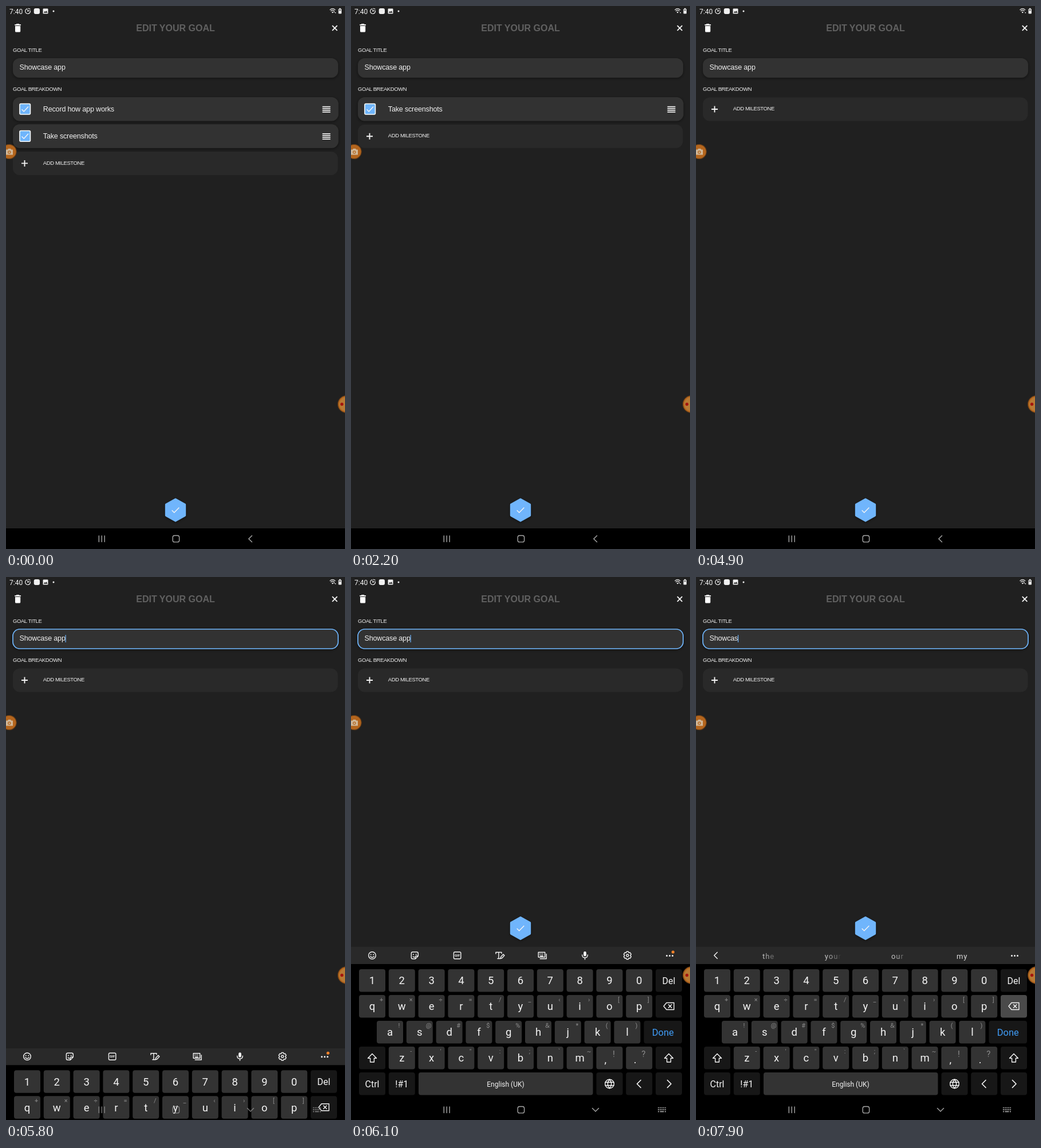
Write an HTML page that moves like this. It is 592 px wide and 947 px high and loops after 8 s.

```html
<!DOCTYPE html>
<html lang="en">
<head>
<meta charset="utf-8">
<title>Edit your goal</title>
<style>
  html, body { margin: 0; width: 100%; height: 100%; overflow: hidden; background: #202020; }
  svg { display: block; width: 100vw; height: 100vh; }
  text { white-space: pre; }
  .body { font: 12.5px "Liberation Sans", Arial, sans-serif; letter-spacing: -.15px; fill: #f2f2f2; }
  .label { font: 9.4px "Liberation Sans", Arial, sans-serif; letter-spacing: -.33px; fill: #f2f2f2; }
  .title { font: bold 16px "Liberation Sans", Arial, sans-serif; fill: #606060; }
  .key { font-family: Roboto, sans-serif; fill: #f4f4f4; text-anchor: middle; }
  .line { fill: none; stroke: #f4f4f4; stroke-width: 1.4; stroke-linecap: round; stroke-linejoin: round; }
</style>
</head>
<body>
<svg id="stage" viewBox="0 0 592 947" preserveAspectRatio="none"></svg>
<script>
const LOOP = 8000, STEP = 100, SWIPE = -119.5, KEYBOARD = 302;
const BLUE = '#6fb5fc', CARD = '#333331', KEY = '#333333', DARK = '#171717';

const group = (id, body, attrs = '') => `<g id="${id}" ${attrs}>${body}</g>`;
const at = (x, y, body) => `<g transform="translate(${x} ${y})">${body}</g>`;
const rect = (x, y, w, h, r, fill, attrs = '') =>
  `<rect x="${x}" y="${y}" width="${w}" height="${h}" rx="${r}" fill="${fill}" ${attrs}/>`;
const circle = (x, y, r, fill, attrs = '') => `<circle cx="${x}" cy="${y}" r="${r}" fill="${fill}" ${attrs}/>`;
const text = (x, y, cls, s, attrs = '') => `<text x="${x}" y="${y}" class="${cls}" ${attrs}>${s}</text>`;
const line = (d, attrs = '') => `<path d="${d}" class="line" ${attrs}/>`;
const shape = (d, fill) => `<path d="${d}" fill="${fill}"/>`;
const glyph = (x, y, size, s, fill = '#f4f4f4') =>
  text(x, y, 'key', s, `style="font-size:${size}px;fill:${fill}"`);

function statusBar() {
  return text(6, 13.5, 'key', '7:40', 'style="font-size:12px;text-anchor:start"')
    + line('M37 4.8A4.4 4.4 0 1 0 42.3 8M38 6.5V9.3L40.5 8M39 4.3L42 5.3', 'style="stroke-width:1.2"')
    + rect(48.7, 4, 10.3, 10, 3, '#f0f0f0')
    + rect(64.5, 4.5, 9, 9, 1.2, '#f0f0f0')
    + shape('M65.7 11.8L67.7 9L69 10.5L70.5 8.3L72.6 11.8Z', '#202020')
    + circle(83, 9, 1.5, '#f0f0f0')
    + line('M565.8 6.6Q570.3 2.8 574.8 6.6M567.4 8.6Q570.3 6.2 573.2 8.6', 'style="stroke-width:1.2"')
    + circle(570.3, 11, 1.2, '#f0f0f0')
    + group('uplink', shape('M571.8 11L573 9.2L574.2 11Z', '#f0f0f0'))
    + shape('M574 11L576.4 11L575.2 13Z', '#f0f0f0')
    + rect(580.5, 5, 5.5, 8.5, 1, '#e8e8e8') + rect(582, 3.8, 2.5, 1.5, .4, '#e8e8e8')
    + rect(581.6, 6, 3.3, 2.2, .3, '#777');
}

function header() {
  return shape('M18.5 31h4.2l.8 1H26v1.8H15.2V32h2.5zM16 34.8h9.2V44q0 1.6-1.6 1.6h-6Q16 45.6 16 44z', '#fff')
    + text(296, 43.6, 'title', 'EDIT YOUR GOAL', 'text-anchor="middle"')
    + line('M569.8 34.2L578.4 42.8M578.4 34.2L569.8 42.8', 'style="stroke-width:1.9;stroke-linecap:butt"')
    + text(12, 79.5, 'label', 'GOAL TITLE')
    + rect(12, 91, 568, 34, 12, CARD, 'id="field" filter="url(#shade)"')
    + text(23.5, 111, 'body', '', 'id="entry"')
    + rect(0, 101, 1.2, 13, 0, BLUE, 'id="caret"')
    + text(12, 148.2, 'label', 'GOAL BREAKDOWN');
}

function milestone(id, name) {
  const bars = [175.6, 178.7, 181.8, 184.9].map(y => rect(552.5, y - .8, 14, 1.7, 0, '#f2f2f2')).join('');
  const bin = line('M522.8 175.3H533M526.2 173.9H529.6M524 177.6V185.4Q524 186.6 525.2 186.6H530.6'
    + 'Q531.8 186.6 531.8 185.4V177.6Z', 'style="stroke:#fff;stroke-linecap:butt;stroke-width:1.5"');
  return group(id, rect(12, 159, 568.5, 41.5, 12, CARD, 'filter="url(#shade)"')
    + rect(23.9, 170.4, 18.6, 18.6, 2, BLUE, 'stroke="#fff" stroke-width="1.5"')
    + line('M27.5 180.3L31.2 184L39 175.5', 'style="stroke-linecap:butt"')
    + text(64.8, 184, 'body', name) + bars
    + rect(595, 159, 104.5, 41.5, 12, '#ec7673')
    + at(-SWIPE, 0, bin));
}

function addRow() {
  return group('add', rect(12, 159.5, 567.5, 41, 12, '#292929')
    + line('M27 180H38M32.5 174.5V185.5', 'style="stroke-width:1.9;stroke-linecap:butt"')
    + text(64.8, 182.3, 'label', 'ADD MILESTONE'));
}

function fab() {
  return group('fab', `<path d="M0-19L16.6-9.6V9.6L0 19L-16.6 9.6V-9.6Z" fill="${BLUE}" stroke="${BLUE}"
    stroke-width="3" stroke-linejoin="round" filter="url(#shade)"/>`
    + line('M-6.3.5L-2.3 4.5L6.3-4.3', 'style="stroke-linecap:butt"'));
}

function toolbar() {
  const icons = [
    circle(0, 0, 6.3, 'none', 'class="line"') + circle(-2.3, -1.6, 1, '#f4f4f4') + circle(2.3, -1.6, 1, '#f4f4f4')
      + line('M-3.2 1.8Q0 5 3.2 1.8'),
    line('M-6-3.5Q-6-6-3.5-6H3.5Q6-6 6-3.5V1L1 6H-3.5Q-6 6-6 3.5ZM1 6V3Q1 1 3 1H6M-3 2Q-2 3.4-.5 3')
      + circle(-2.4, -1.8, 1, '#f4f4f4') + circle(2.4, -1.8, 1, '#f4f4f4'),
    rect(-6.2, -6, 12.4, 12, 2, 'none', 'class="line"')
      + text(0, 2.2, 'key', 'GIF', 'style="font-size:6px;font-weight:bold"'),
    line('M-7-3V-5.5H3V-3.5M-2-5.5V5.5M-4 5.5H0M1 5.5L1.8 2.5L6-2L8 0L4 4.5Z'),
    line('M-7-5.5H4.5V3H-7ZM7-2.5V5.7H-4')
      + line('M-5-3H2.5M-5-.8H2.5', 'style="stroke-dasharray:1 1.4;stroke-linecap:butt"') + line('M-3.5 1.2H1'),
    rect(-2.4, -7, 4.8, 8.6, 2.4, '#f4f4f4') + line('M-4.8-1Q-4.8 4 0 4T4.8-1M0 4V7'),
    line('M-1.6-6.8H1.6L2.3-4.6L4.6-5L6.5-2.2L5 0L6.5 2.2L4.6 5L2.3 4.6L1.6 6.8H-1.6L-2.3 4.6L-4.6 5L-6.5 2.2'
      + 'L-5 0L-6.5-2.2L-4.6-5L-2.3-4.6Z') + circle(0, 0, 2, 'none', 'class="line"')
  ];
  return icons.map((icon, i) => at(37 + 74.3 * i, 660, icon)).join('') + circle(562.3, 654, 2.6, '#f0822b');
}

function suggestions() {
  const word = (s, i) => {
    const fade = [...s].map((c, k) => `<tspan fill-opacity="${[.85, .65, .4, .12][k]}">${c}</tspan>`);
    return text(126.5 + 112.7 * i, 665.6, 'key', s === 'my' ? s : fade.join(''),
      'style="font-size:13px;letter-spacing:.9px;fill:#ddd"');
  };
  return line('M37.2 654.5L31.7 660L37.2 665.5') + ['the', 'your', 'our', 'my'].map(word).join('');
}

function keyboard() {
  const pitch = 51.8, tops = [684, 729, 774, 819, 864];
  const cap = (x, row, w, fill, attrs) => rect(x, tops[row], w, 39.5, 4, fill, attrs);
  const run = (x0, row, keys, hints = '') => [...keys].map((c, i) => {
    const x = x0 + pitch * i, y = tops[row], small = ',.'.includes(c);
    const hint = hints[i] ? glyph(x + (small ? 30.5 : 39), y + (small ? 18 : 12), small ? 15 : 11, hints[i], '#8c8c8c') : '';
    return cap(x, row, 46, KEY) + glyph(x + (small ? 16 : 23), y + (small ? 29 : 26.3), 18.5, c) + hint;
  }).join('');
  const dark = (x, row, w, label = '', size = 16, fill) =>
    cap(x, row, w, DARK) + glyph(x + w / 2, tops[row] + 25.6, size, label, fill);
  const shift = x => dark(x, 3, 46) + at(x + 23, 839, line('M0-7.5L7.5.3H3.4V7H-3.4V.3H-7.5Z'));
  const right = 14 + pitch * 10;
  const globe = circle(0, 0, 7.8, 'none', 'class="line"')
    + line('M-7.5-2.7H7.5M-7.5 2.7H7.5M0-7.8Q-6.5 0 0 7.8M0-7.8Q6.5 0 0 7.8');
  return group('keyboard', rect(0, 645, 592, 302, 0, '#000') + rect(0, 645, 592, 30, 0, '#292929')
    + group('tools', toolbar()) + group('words', suggestions())
    + [551.5, 556.5, 561.5].map(x => circle(x, 660.5, 1.5, '#f4f4f4')).join('')
    + run(14, 0, '1234567890') + dark(right, 0, 46, 'Del')
    + run(14, 1, 'qwertyuiop', '+×÷=/_&lt;>[]'.replace('&lt;', '‹').replace('>', '›'))
    + cap(right, 1, 46, DARK, 'id="erase"')
    + at(555, 748.5, line('M-9 0L-4-6H9V6H-4ZM-.5-2.7L4.9 2.7M4.9-2.7L-.5 2.7'))
    + run(45, 2, 'asdfghjkl', '!@#$%§*()'.replace('§', '＆')) + dark(511.5, 2, 66.5, 'Done', 16.5, '#3f9bf5')
    + shift(14) + run(14 + pitch, 3, 'zxcvbnm,.', "-':;`~".replace(/.*/, '') || '-\'":;`~!?') + shift(right)
    + dark(14, 4, 46, 'Ctrl') + dark(14 + pitch, 4, 46, '!#1')
    + cap(118, 4, 304.5, KEY) + glyph(270, 888.5, 12, 'English (UK)')
    + dark(428.5, 4, 46) + at(451.5, 884, globe)
    + dark(480.2, 4, 46) + line('M506 877.5L499.5 884L506 890.5', 'style="stroke-width:1.7"')
    + dark(right, 4, 46) + line('M552.5 877.5L559 884L552.5 890.5', 'style="stroke-width:1.7"'));
}

function navBar() {
  const keys = line('M536 925.6H550M536 929H550', 'style="stroke-dasharray:1.8 1.3;stroke-linecap:butt;stroke-width:1.8"')
    + line('M536 932.4H538M539.5 932.4H546.5M548 932.4H550', 'style="stroke-linecap:butt;stroke-width:1.8"');
  return group('nav', line('M162.3 924V934.5M167.2 924V934.5M172.1 924V934.5')
    + rect(291.2, 923.5, 11.4, 11.4, 3.2, 'none', 'class="line"')
    + group('back', line('M429.5 923.8L423.8 929.3L429.5 934.8'))
    + group('down', line('M421.5 926.6L427 932L432.5 926.6') + keys));
}

function floaters() {
  const orange = 'stroke="#5b3818" stroke-width="1.2"';
  return circle(5.5, 254, 12.7, '#b4651d', orange)
    + shape('M0 250.5H2.5L4 248.8H8L9.5 250.5H12V259.5H0Z', '#d0b798')
    + circle(5.8, 255, 2.7, '#b4651d') + circle(5.8, 255, 1.5, '#d0b798')
    + circle(594.5, 694.5, 15, '#b4651d', orange)
    + circle(594.5, 694.5, 12.5, '#b87a34') + circle(586.6, 694.5, 2.7, '#a3160f');
}

const stage = document.getElementById('stage');
stage.innerHTML = `<defs><filter id="shade" x="-20%" y="-40%" width="140%" height="190%">
  <feDropShadow dx="0" dy="1.5" stdDeviation="2.4" flood-color="#000" flood-opacity=".45"/></filter></defs>`
  + rect(0, 0, 592, 947, 0, '#202020') + statusBar() + header()
  + addRow() + milestone('record', 'Record how app works') + milestone('shots', 'Take screenshots')
  + fab() + rect(0, 911, 592, 36, 0, '#000') + keyboard() + navBar() + floaters();

const el = {};
stage.querySelectorAll('[id]').forEach(node => el[node.id] = node);
stage.querySelectorAll('#nav .line').forEach(node => node.style.stroke = '#a8a8a8');

const show = (node, on) => node.setAttribute('visibility', on ? 'visible' : 'hidden');
const move = (node, x, y) => node.setAttribute('transform', `translate(${x} ${y})`);
const ease = u => { u = Math.min(1, Math.max(0, u)); return u * u * (3 - 2 * u); };
const swipe = (t, start) => SWIPE * ease((t - start) / 310);
const erasures = [7200, 7300, 7400, 7500, 7900];

function draw(t) {
  const focus = t >= 5600, settled = t >= 6100, typed = t >= 7900;
  const left = (t < 1900) + (t < 4900);

  show(el.record, left === 2);
  show(el.shots, left > 0);
  move(el.record, swipe(t, 560), 0);
  move(el.shots, swipe(t, 3485), left === 2 ? 47.2 : 0);
  move(el.add, 0, left * 47.2);

  el.field.setAttribute('stroke', focus ? BLUE : 'none');
  el.field.setAttribute('stroke-width', 1.7);
  const full = 'Showcase app';
  el.entry.textContent = full.slice(0, full.length - erasures.filter(e => t >= e).length);
  el.caret.setAttribute('x', 23.3 + el.entry.getComputedTextLength());
  show(el.caret, focus && !(t >= 6300 && t < 6800));

  move(el.keyboard, 0, KEYBOARD * (1 - ease((t - 5578) / 500)));
  show(el.keyboard, focus);
  move(el.fab, 296, t >= 6000 ? 612.5 : 879);
  show(el.tools, !typed);
  show(el.words, typed);
  el.tools.setAttribute('opacity', t >= 7800 ? .5 : 1);
  el.erase.setAttribute('fill', t >= 7000 && t < 7600 || t >= 7800 ? '#4a4a4a' : DARK);

  show(el.back, !focus);
  show(el.down, focus);
  el.nav.setAttribute('opacity', focus && !settled ? .7 : 1);
  show(el.uplink, t < 2200 || t >= 5300);
}

const start = performance.now();
function tick() {
  const t = (performance.now() - start) % LOOP;
  draw(Math.floor(t / STEP) * STEP);
  requestAnimationFrame(tick);
}
tick();
</script>
</body>
</html>
```
